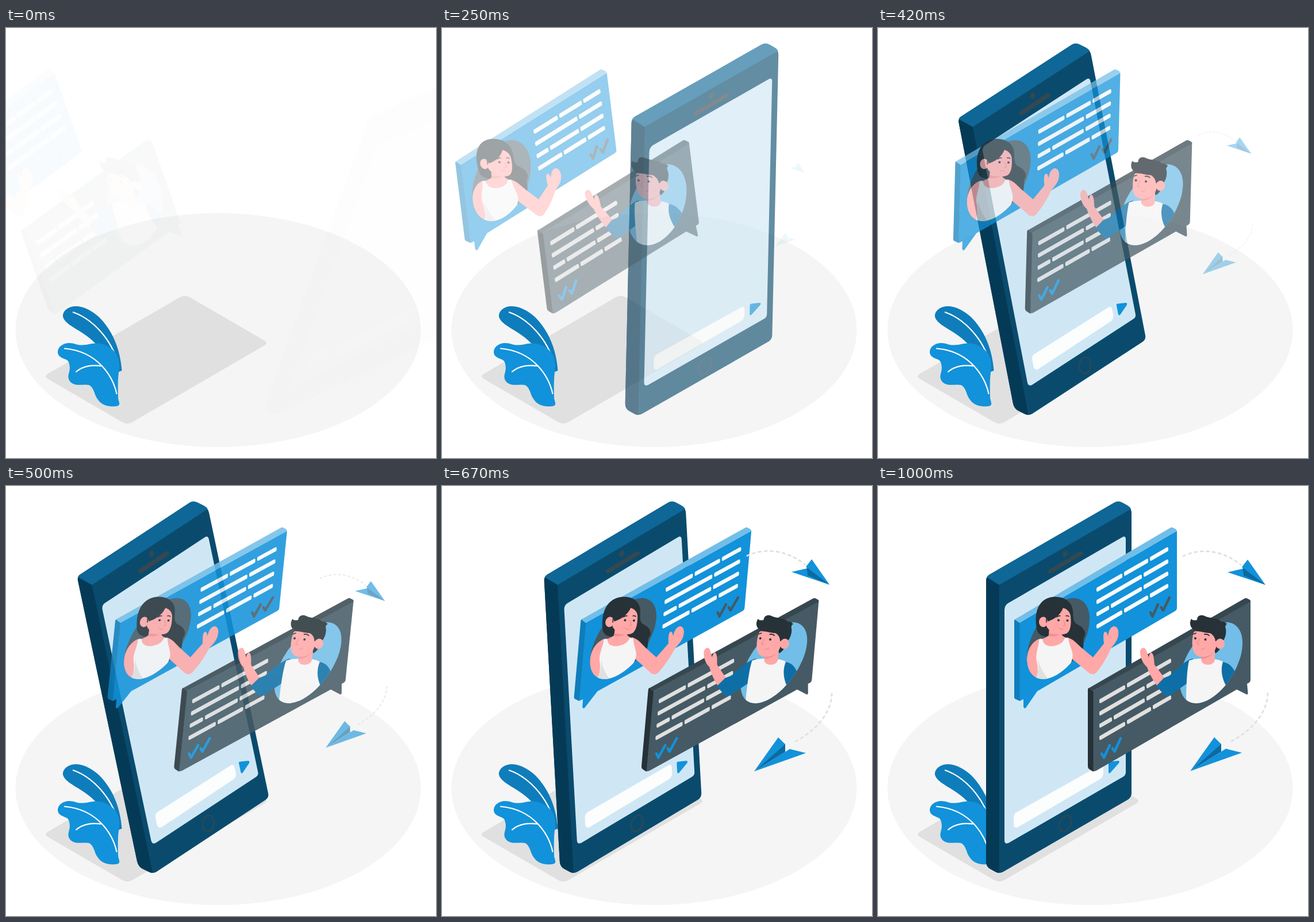
These frames come from a looping animation (748 px wide and 748 px high, 1.04 s). An HTML page:

```html
<!DOCTYPE html>
<html lang="en">
<head>
<meta charset="utf-8">
<title>Mobile chat</title>
<style>
  html, body { margin: 0; width: 100%; height: 100%; overflow: hidden; background: #fff; }
  svg { display: block; width: 100%; height: 100%; }
  .night { fill: #263238 } .slate { fill: #455a64 } .coal { fill: #37474f }
  .blue { fill: #1292da } .deep { fill: #0f7dbb } .sky { fill: #72bee8 }
  .skin { fill: #ffa8a7 } .blush { fill: #f28f8f } .cloth { fill: #f5f5f5 }
  .line { fill: none; stroke-linecap: round; stroke-linejoin: round }
  .bars { stroke-width: 3.6; stroke-linejoin: round }
  .dash { fill: none; stroke: #e0e0e0; stroke-width: 2.8; stroke-linecap: round; stroke-dasharray: 4 6.5 }
</style>
</head>
<body>
<svg viewBox="0 0 748 748">
  <defs>
    <clipPath id="herClip"><ellipse cx="313.5" cy="265.5" rx="43" ry="78" transform="rotate(31 313.5 265.5)"/></clipPath>
    <clipPath id="hisClip"><ellipse cx="579.5" cy="307.5" rx="43" ry="78" transform="rotate(31 579.5 307.5)"/></clipPath>
  </defs>

  <ellipse cx="369" cy="525.5" rx="352.5" ry="203.5" fill="#f5f5f5"/>
  <path fill="#e0e0e0" d="M72 602L303 468Q311 464 319 468L450 544Q456 548 450 552L219 686Q211 690 203 686L72 610Q66 606 72 602Z"/>

  <!-- plant -->
  <path class="deep" d="M196 598L201.5 596C199 560 186 527 162 503C148 490 132 483 119 484C106 485 98 494 99 502C101 512 116 520 129 528C145 538 156 548 166 560C180 575 190 587 196 598Z"/>
  <path class="line" stroke="#fff" stroke-width="2.2" d="M117 494.5C150 506 183 540 196 586"/>
  <path class="blue" d="M90 564C90 554 100 548 110 548C119 548 123 552 133 551.500C143 551 150 548 159 548.500C172 549 185 557 191 566C198 576 198 588 196 600C194 615 195 632 195 642C195 648 198 651 197 655C196 659 183 659 175 657C165 654 160 648 156 640C153 632 151 624 144 621C136 619 126 623 117 619C110 616 107 609 109 602C111 595 112 590 109 581C106 574 91 576 90 564Z"/>
  <path class="line" stroke="#fff" stroke-width="2.2" d="M102 557.500C130 560 152 572 167 588C181 603 189 620 192.500 636M122 598C135 587 150 586 167 588"/>

  <g id="phone">
    <path fill="#0a4b6d" d="M188 165Q188 157 194 154L411 29Q418 25 425 29L434 34Q441 38 441 47V534Q441 542 434 546L218 671Q211 675 204 671L195 666Q188 662 188 653Z"/>
    <path fill="#053a57" d="M188 165Q188 161 190 159L211 172V673Q207 673 204 671L195 666Q188 662 188 653Z"/>
    <path fill="#0e6796" d="M190 159Q191 156 194 154L411 29Q418 25 425 29L434 34Q438 36 440 40L211 172Z"/>
    <path fill="#cfe7f5" d="M220 216Q220 208 226 204L425 89Q431 86 431 93V498Q431 503 426 506L227 621Q220 624 220 616Z"/>
    <ellipse class="coal" cx="325.500" cy="118" rx="4" ry="6" transform="rotate(25 325.500 118)"/>
    <path class="line" stroke="#37474f" stroke-width="7" d="M299.500 148.500L353 117"/>
    <ellipse class="line" stroke="#37474f" stroke-width="2" cx="326" cy="587" rx="9.500" ry="15" transform="rotate(25 326 587)"/>
    <path fill="#fcfdfd" d="M236 578Q236 570 242 567L386 486Q392 483 392 490V499Q392 506 386 510L244 593Q236 597 236 588Z"/>
    <path class="blue" d="M401 482Q401 480 404 479.500L418 478Q421 478 419 482L404 499Q401 501 401 497Z"/>
  </g>

  <g id="chat">
    <!-- her message -->
    <path class="blue" d="M246 238L520 78V212Q520 216 516 218L277 357L257 386Q254 388 253 384V371L246 374Z"/>
    <path class="deep" d="M237 235Q237 233 238 232L246.500 238V374L240 371Q237 370 237 367Z"/>
    <path class="sky" d="M238 232L508 73Q511 71 514 73L518 75L520 78L246 238Z"/>
    <path class="bars" data-x="380" data-y="181.2" fill="#fafafa" stroke="#fafafa"/>
    <path class="line" stroke="#455a64" stroke-width="4.400" d="M474 220L477.500 227L487 206M492.500 211L496 216.500L507 194"/>
    <g clip-path="url(#herClip)">
      <path class="slate" d="M240 180H390V350H240Z"/>
      <path class="skin" d="M284 265C269 268 259 285 259 302C259 316 262 328 266 338L275 336L282 300Z"/>
    </g>
    <path class="night" d="M276 248C271 220 279 196 304 193C322 191 335 200 338 212C341 223 337 233 345 240C358 245 363 255 359 262C355 268 360 277 355 287C345 282 335 270 325 264L292 262C283 261 277 256 276 248Z"/>
    <path class="skin" d="M328 263C341 266 347 276 356 283L374 298L393 274C392 265 391 255 395 253.500C398.500 253 399 258 400 261C401 252 405 244 411 244C419 245 420 257 416 267C412 275 409 277 405 283C399 296 392 310 381 323Q376 330 368 326L332 296Z"/>
    <path class="skin" d="M298 244L297 260Q289 266 280 267L288 287H324L332 265Q322 264 318 256Z"/>
    <g clip-path="url(#herClip)">
      <path class="cloth" d="M280 267L286 266C287 277 297 280 307 278C317 276 323 271 325 264L331 265C333 280 341 289 338 300C336 308 333 315 333 325L305 345H270C279 328 279 316 276 305C273 293 280 280 280 267Z"/>
      <path fill="#e0e0e0" d="M278 300C282 317 289 327 297 337H274C279 326 280 315 278 300Z"/>
    </g>
    <path class="blush" d="M298 256Q306 259 318 257Q308 263 297 261Z"/>
    <path class="skin" d="M293 236C306 233 317 225 322 212C329 214 334 219 335 226C336 236 336 247 331 254C326 260 313 259 304 255Q296 250 293 244Z"/>
    <ellipse class="skin" cx="287.500" cy="236.500" rx="7.500" ry="9"/>
    <path class="line" stroke="#263238" stroke-width="1.600" d="M311 228Q313 225.500 317 226M327 226Q330 225 332 227M293 228V237"/>
    <circle class="night" cx="314" cy="233.500" r="2"/><circle class="night" cx="329.500" cy="234" r="2"/>
    <path class="line" stroke="#f28f8f" stroke-width="1.500" d="M323 234L326 242L322 243M315 247Q318 250 322 249"/>

    <!-- his message -->
    <path class="slate" d="M374 357L648 199V337Q648 341 644 343L642 344L643.500 360Q643.500 364 640 362L624 354L380 495Q376 497 374 496Z"/>
    <path class="night" d="M365 354Q365 352 367 351L374.500 357V497L368 493Q365 491 365 488Z"/>
    <path class="coal" d="M366 352L637 196Q640 194 643 196L647 198L648 201L374 357Z"/>
    <path class="bars" data-x="385" data-y="375.2" fill="#e0e0e0" stroke="#e0e0e0"/>
    <path class="line" stroke="#1292da" stroke-width="4.400" d="M389 465.500L393 472.500L403 451M408 456.500L411.500 462L422 439"/>
    <g clip-path="url(#hisClip)">
      <path class="sky" d="M500 220H660V390H500Z"/>
      <path fill="#0e6fa6" d="M598 306C612 307 620 318 623 330L607 354L596 340Z"/>
    </g>
    <path class="skin" d="M456 291C455 284 460 280 464 282C468 286 469 293 471 298C472 294 473 289 476 290C480 293 480 302 481 311L500 336L486 348C478 338 472 326 468 315C461 309 457 300 456 291Z"/>
    <path fill="#0e6fa6" d="M548 300C534 303 522 317 507 330L497 334L484 348Q495 361 503 367Q520 356 541 341Z"/>
    <g clip-path="url(#hisClip)">
      <path class="cloth" d="M541 304C550 299 590 298 600 306C595 321 599 337 607 350L595 385H536C536 350 537 322 541 304Z"/>
    </g>
    <path class="night" d="M547 264C550 258 549 254 550 250C543 247 541 238 545 231C547 234 551 234 555 233C555 225 562 223 568 226C577 231 590 228 597 236Q602 235 607 240Q604 242 604 245C607 253 605 263 600 270C597 278 595 287 587 291L577 270Z"/>
    <path class="skin" d="M564 290L562 302C563 314 585 314 586 302V284Z"/>
    <path class="blush" d="M563 297Q577 295 585 286Q580 299 563 301Z"/>
    <path class="skin" d="M549 255C553 248 558 249 566 252C574 255 581 254 585 258L589 270L588 281C584 294 572 298 561 297C553 296 548 290 547 280C546 270 547 262 549 255Z"/>
    <path class="night" d="M549 253C558 246 571 246 588 252L592 270H587C586 263 583 259 578 256C568 256 557 251 549 253Z"/>
    <ellipse class="skin" cx="595" cy="274.500" rx="8" ry="9"/>
    <path class="line" stroke="#263238" stroke-width="1.800" d="M549 257.500L553 256M568 258Q573 257 576 260"/>
    <circle class="night" cx="552" cy="265" r="2"/><circle class="night" cx="569.500" cy="267" r="2"/>
    <path class="line" stroke="#f28f8f" stroke-width="1.500" d="M559 266L555 275L559 276M562 284Q565 285 568 282"/>
  </g>

  <g id="planes">
    <path class="dash" d="M531 122C556 109 597 109 631 137M615 444C650 425 678 395 678 359"/>
    <path class="blue" d="M608 150L634 144L674 172Z"/>
    <path fill="#0b6aa0" d="M634 139L674 172L636 156Z"/>
    <path class="blue" d="M643 128L674 172L633 141Z"/>
    <path class="blue" d="M543 496L605 457L633 464Z"/>
    <path fill="#0b6aa0" d="M543 496L597 448V462Z"/>
    <path class="blue" d="M543 496L585 437L597 449Z"/>
  </g>
</svg>

<script>
const LOOP = 1040, FPS = 24, SHIFT = 374;
const $ = id => document.getElementById(id);

// Text rows: where each bar starts along x, then the row's end
const rows = [[0, 48, 93, 128], [0, 82, 128], [0, 25, 82, 128], [0, 48, 93, 128]];
for (const el of document.querySelectorAll('.bars')) {
  const x0 = +el.dataset.x, y0 = +el.dataset.y, half = 1.8, gap = 3;
  const bar = (from, to, row) => {
    const y = x => y0 + row * 21.3 - x * 0.577;
    return `M${x0 + from} ${y(from) - half}L${x0 + to} ${y(to) - half}v${2 * half}` +
      `L${x0 + from} ${y(from) + half}Z`;
  };
  el.setAttribute('d', rows.map((stops, row) => stops.slice(1).map((end, i) =>
    bar(stops[i] + half, end - gap - half, row)).join('')).join(''));
}

const cubic = (a, b, s) => 3 * (1 - s) ** 2 * s * a + 3 * (1 - s) * s * s * b + s ** 3;
const linear = x => x;

// cubic-bezier(.36, -.01, .5, 1.38), solved by bisection
function spring(x) {
  let lo = 0, hi = 1;
  for (let i = 0; i < 30; i++) {
    const mid = (lo + hi) / 2;
    if (cubic(0.36, 0.5, mid) < x) lo = mid; else hi = mid;
  }
  return cubic(-0.01, 1.38, lo);
}

const tan = deg => Math.tan(deg * Math.PI / 180);
const mix = (a, b, p) => a + (b - a) * p;

// Slide in from one side, leaning back, then forward, then settling
function rush(el, t, dir, pivot, ease) {
  let shift = 0, lean, alpha = 1;
  if (t < 0.6) {
    const p = ease(t / 0.6);
    shift = dir * SHIFT * (1 - p);
    lean = mix(tan(-20), tan(10), p);
    alpha = Math.min(1, Math.max(0, p));
  } else if (t < 0.8) {
    lean = mix(tan(10), tan(-2), ease((t - 0.6) / 0.2));
  } else {
    lean = mix(tan(-2), 0, ease((t - 0.8) / 0.2));
  }
  lean *= dir;
  el.setAttribute('transform', `matrix(1 0 ${lean} 1 ${shift - lean * pivot} 0)`);
  el.setAttribute('opacity', alpha);
}

function zoom(el, t) {
  const p = spring(t), scale = (0.5 + 0.5 * p) ** 2;
  el.setAttribute('transform', `translate(604 304.5) scale(${scale}) translate(-604 -304.5)`);
  el.setAttribute('opacity', Math.min(1, p * p));
}

const start = performance.now();
function draw() {
  const ms = (performance.now() - start) % LOOP;
  const step = Math.min(FPS, Math.floor((ms + 4) * FPS / 1000));
  const t = Math.min(1, (step + 0.4) / FPS);
  rush($('phone'), t, 1, 349.5, spring);
  rush($('chat'), t, -1, 284, linear);
  zoom($('planes'), t);
  requestAnimationFrame(draw);
}
draw();
</script>
</body>
</html>
```
